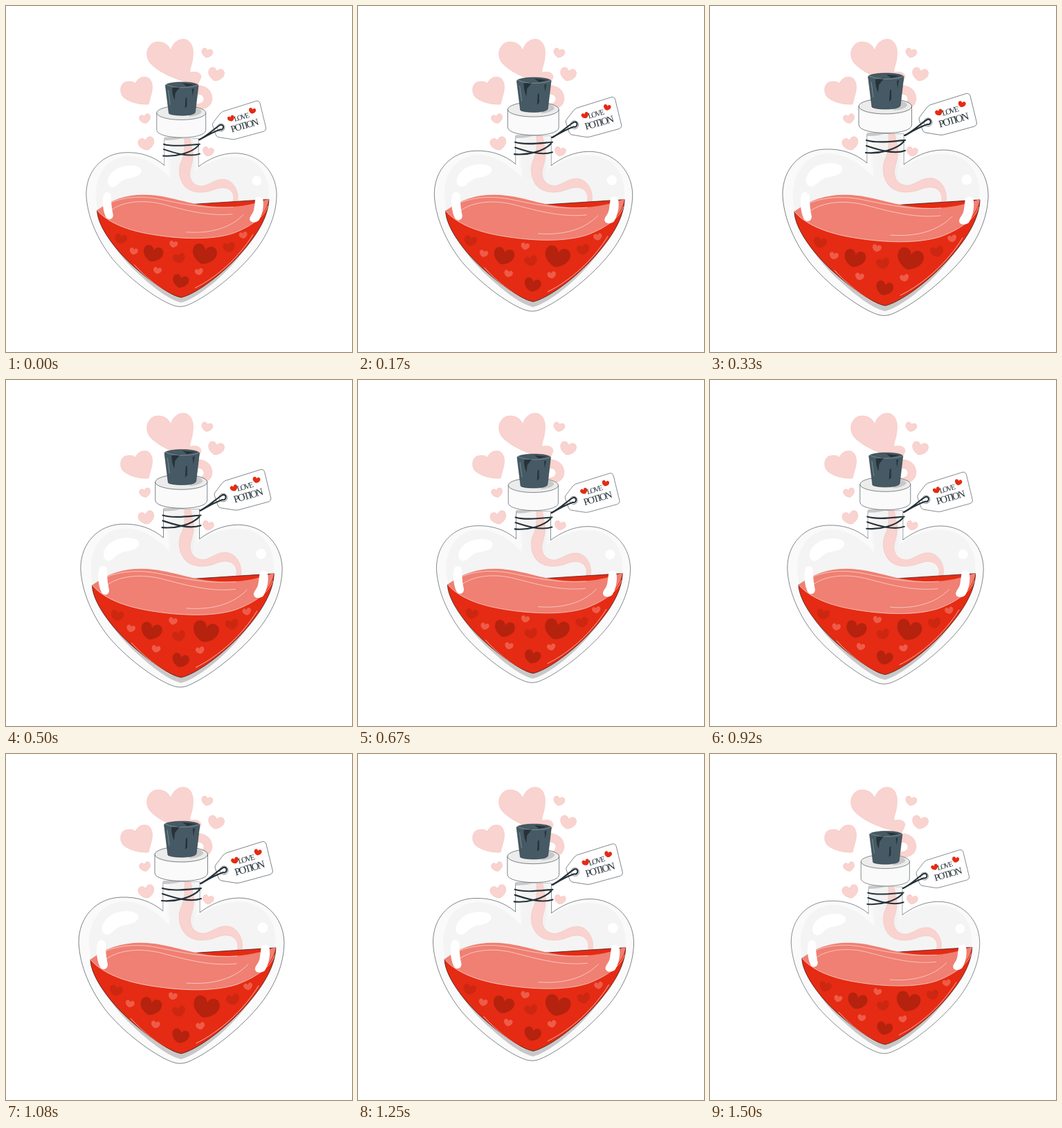
Write an HTML page that moves like this. It is 500 px wide and 500 px high and loops after 1540 ms.

```html
<!DOCTYPE html>
<html lang="en">
<head>
<meta charset="utf-8">
<style>
  html, body { margin: 0; width: 100%; height: 100%; overflow: hidden; background: #fff; }
  svg { display: block; width: 100vw; height: 100vh; }
  .smoke { fill: #f9d3cf; stroke: #eea69d; stroke-width: .6; stroke-dasharray: 1 1; }
  .line { fill: none; stroke: #fbd9d4; stroke-width: .8; stroke-linecap: round; }
  .ink { stroke: #263238; stroke-width: .6; }
  .string { fill: none; stroke: #263238; stroke-width: 2.2; stroke-linecap: round; }
  .shade { fill: #c8c8c8; }
  text { font-family: "Liberation Serif", serif; text-anchor: middle; fill: #263238; }
</style>
</head>
<body>
<svg viewBox="0 0 500 500">
  <defs>
    <path id="heart" d="M0 .4C-.2 .36-.5 .16-.5-.12C-.5-.44-.1-.5 0-.18C.1-.5 .5-.44 .5-.12C.5 .16 .2 .36 0 .4Z"/>
    <path id="liquid" d="M122 297C122 320 148 358 184 389C208 410 234 429 253 433C272 429 309 404 340 371C373 336 389 306 390 280Z"/>
    <linearGradient id="neck">
      <stop offset="0" stop-color="#fff"/><stop offset=".18" stop-color="#f4f4f4"/>
      <stop offset=".8" stop-color="#f1f1f1"/><stop offset="1" stop-color="#fafafa"/>
    </linearGradient>
  </defs>

  <g id="puffs" class="smoke">
    <path d="M238 64C241 53 249 47 258 48C269 50 272 63 270 75C269 85 265 91 266 96C275 94 281 96 282 102C281 107 278 110 277 115C289 115 298 122 298 134C297 146 287 151 270 149V141C280 143 286 140 286 134C285 127 279 126 270 129L262 110C244 106 219 95 208 82C199 70 205 54 217 52C228 51 235 56 238 64Z"/>
    <path d="M187 112C190 104 198 101 204 103C212 106 213 118 210 127L206 142C194 143 178 139 170 132C163 125 165 113 172 110C179 108 184 109 187 112Z"/>
  </g>

  <g id="bottle">
    <path class="ink" fill="#fafafa" d="M227 185V227C210 213 190 206 166 207C131 208 105 235 105 272C106 305 122 343 147 374C176 408 220 439 243 446Q253 449 263 445C292 433 335 400 363 367C387 339 402 305 402 272C401 234 372 208 337 208C314 208 295 218 280 229V185Z"/>
    <path fill="#f4f4f4" d="M236 185V247C216 226 194 213 170 213C139 214 119 240 120 276L123 300L389 285C394 247 378 217 342 214C317 212 295 221 271 238V185Z"/>
    <path fill="url(#neck)" d="M227.500 185H279.500V228Q273 236 274 249H236V235L227.500 227Z"/>
    <path class="smoke" d="M258 185C259 198 258 210 254 219C247 233 250 252 261 262C274 272 291 270 304 265C319 259 330 262 334 272C336 278 334 283 333 287Q338 287 341 283C344 269 336 252 322 249C307 247 300 256 288 259C273 261 264 248 267 235C269 226 273 218 271 205L267 185Z"/>

    <use href="#liquid" class="shade" transform="translate(12.500 8) scale(.95 1)"/>
    <use href="#liquid" fill="#e52b13" stroke="#3d1a18" stroke-width=".8"/>
    <path fill="#ef8073" d="M122 297C149 276 180 270 213 274C247 278 276 292 321 292C349 292 371 286 390 279C385 306 363 322 334 333C300 344 252 342 209 335C171 329 139 317 122 297Z"/>
    <path class="line" d="M122 297C139 317 171 329 209 335C252 342 300 344 334 333C363 322 383 307 388 291M127 293C154 276 187 274 216 279C252 286 286 295 334 292M145 296C165 282 196 281 222 287C260 297 296 307 333 303M261 331C300 334 331 324 350 304M365 335C343 371 308 402 275 418M180 382C199 403 220 419 240 430"/>
    <g id="bubbles"></g>

    <g fill="#fff">
      <path d="M139 255C137 243 149 231 165 228C179 225 193 229 191 237C189 244 179 246 168 248C157 251 153 261 146 261Q140 260 139 255Z"/>
      <path d="M133 271C137 267 144 269 144 276C144 287 145 295 147 304C147 313 137 313 135 306C131 297 129 279 133 271Z"/>
      <path d="M369 278C373 274 381 275 381 283C382 293 379 306 374 313C369 317 361 317 360 311C360 305 366 303 367 293Z"/>
      <circle cx="371" cy="251" r="7.500"/>
    </g>

    <path class="shade" d="M227 183H258Q246 188 227 188Z"/>
    <path class="ink" fill="#fafafa" d="M215 145V172C216 187 291 188 291.500 172V145Z"/>
    <ellipse class="ink" cx="253.300" cy="145" rx="38.300" ry="11" fill="#ececec"/>
    <path class="shade" d="M272 136Q286 139 285 144Q280 150 265 151Z"/>

    <path class="ink" fill="#455a64" d="M228.500 102C232 96 274 95 280 102L275 144C273 151 238 150 234 146Z"/>
    <path fill="#263238" d="M239 106L252 104L244 114L243 125Q239 117 239 106ZM260 122L262 121V135L259 138ZM270 108L273 107L271 119ZM255 99L275 101L262 104Z"/>
    <path class="line" style="stroke:#b4c0c5;stroke-width:.5" d="M230 101C240 107 269 107 279 102M233 110L236 132"/>

    <path class="ink" fill="#fff" d="M318 143L369 127Q374 125 376 130L385.500 169Q386 172 382 174L338 186Q334 187 330 186L311 183Q308 182 307 179L302 164Q302 161 304 159L314 146Z"/>
    <circle class="ink" cx="315" cy="168" r="6" fill="#fff"/>
    <path class="string" d="M226 194C242 199 267 195 282 194M226 202C241 207 265 215 282 209M225 212C246 214 270 207 280 196M281 187C294 181 304 170 314 164C321 162 320 173 314 171C305 174 292 181 282 187"/>
    <g transform="translate(350 157) rotate(-16)">
      <text x="-2" y="-2" font-size="11.500" letter-spacing="-1.900">LOVE</text>
      <text x="-1" y="13" font-size="15" letter-spacing="-2">POTION</text>
    </g>
    <g id="seals"></g>
  </g>
</svg>
<script>
  const byId = id => document.getElementById(id);

  function addHeart(parent, x, y, size, tilt, fill) {
    const use = document.createElementNS("http://www.w3.org/2000/svg", "use");
    use.setAttribute("href", "#heart");
    use.setAttribute("transform", `translate(${x} ${y}) rotate(${tilt}) scale(${size})`);
    use.setAttribute("style", `fill:${fill};stroke-width:${0.6 / size};stroke-dasharray:${1 / size}`);
    byId(parent).append(use);
  }

  // Hearts left of the bottle's axis lean one way, those on the right the other
  const AXIS = 253.5;
  const inward = x => x < AXIS - 5 ? 13 : -13;
  const outward = x => -inward(x);
  const rightward = () => 15;

  function addHearts(parent, fill, size, tilt, points) {
    for (const [x, y] of points) addHeart(parent, x, y, size, tilt(x), fill);
  }
  addHearts("puffs", "#f9d3cf", 16, outward, [[290.5, 68], [201, 163], [292, 210.5]]);
  addHearts("puffs", "#f9d3cf", 23, outward, [[303.5, 99], [203, 199]]);
  addHearts("bubbles", "#b5220e", 31, rightward, [[209, 365]]);
  addHearts("bubbles", "#b5220e", 38, rightward, [[289, 366]]);
  addHearts("bubbles", "#b5220e", 25, rightward, [[252, 408]]);
  addHearts("bubbles", "#cc2711", 19, inward, [[159, 342], [250, 372], [328, 355]]);
  addHearts("bubbles", "#ee5c49", 13, inward, [[179, 361], [241, 350], [216, 391], [281, 393], [350, 336]]);
  addHearts("seals", "#e52b13", 11, x => x - 354, [[331, 154], [364, 142]]);

  // The bottle swells and shrinks evenly between these turning points (ms)
  const LOOP = 1540, SWELL = 0.1, DRAWN_SCALE = 1.09;
  const turns = [-40, 370, 790, 1115, 1500, 1910];

  function scaleAt(t) {
    const i = turns.findIndex(turn => turn > t);
    const part = (t - turns[i - 1]) / (turns[i] - turns[i - 1]);
    return 1 + SWELL * (i % 2 ? part : 1 - part);
  }

  function draw() {
    const scale = scaleAt(performance.now() % LOOP) / DRAWN_SCALE;
    byId("bottle").setAttribute("transform",
      `translate(${AXIS} 272) scale(${scale}) translate(${-AXIS} -272)`);
    requestAnimationFrame(draw);
  }
  draw();
</script>
</body>
</html>
```
